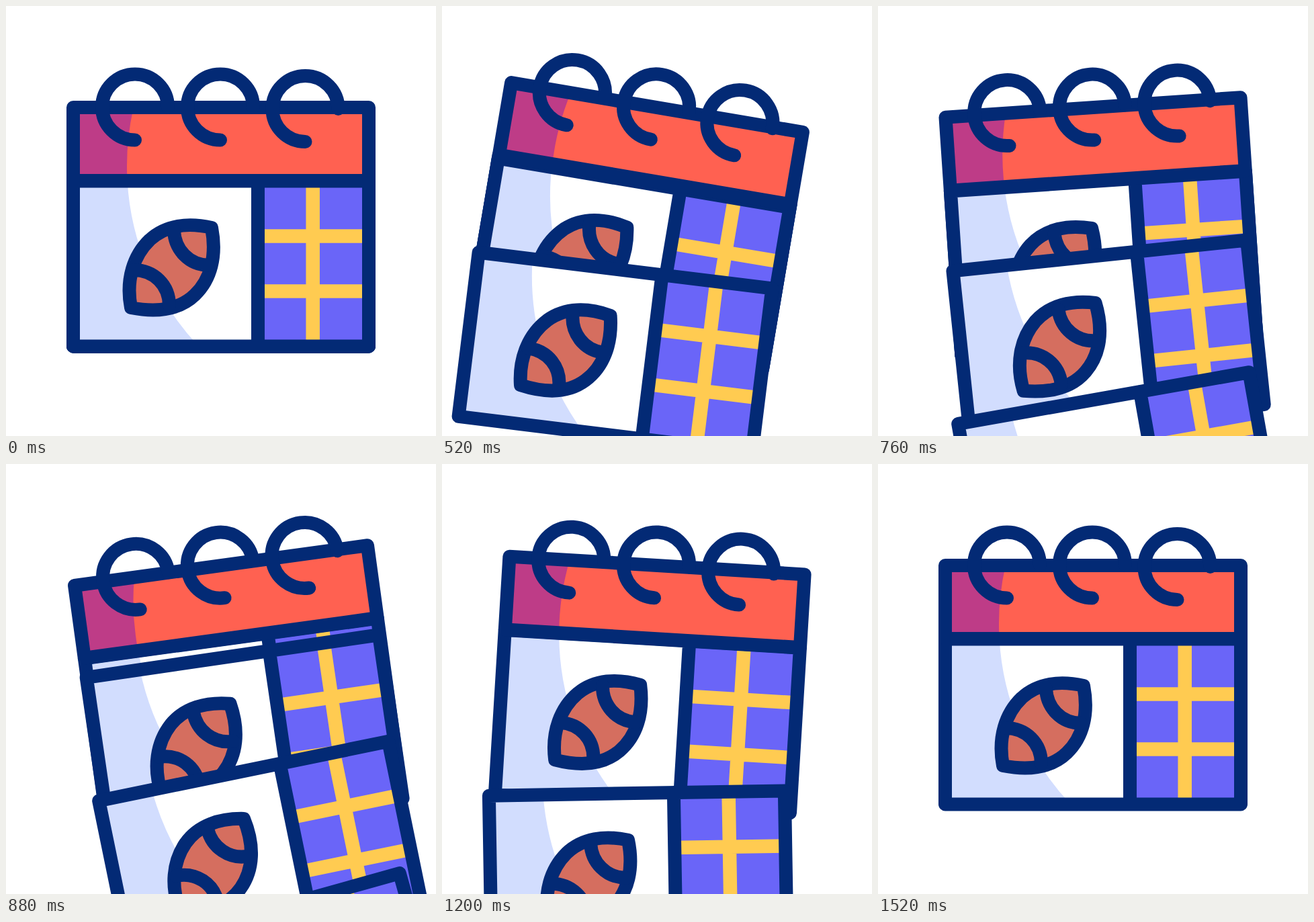
Recreate the animation shown at these times as an HTML page. Size 640 by 640 pixels, loop 1800 ms.

```html
<!DOCTYPE html>
<html lang="en">
<head>
<meta charset="utf-8">
<title>Game day calendar</title>
<style>
  html, body { margin: 0; height: 100%; overflow: hidden; background: #fff; }
  svg { display: block; width: 100vw; height: 100vh; }
  .line { fill: none; stroke: #032a75; stroke-width: 20; stroke-linecap: round; stroke-linejoin: round; }
</style>
</head>
<body>
<svg viewBox="0 0 640 640">
  <defs>
    <g id="page">
      <path fill="#fff" d="M100 260H375V506.5H100z"/>
      <path fill="#d2ddfe" d="M100 260H180.6A391 391 0 0 0 286.3 506H100z"/>
      <path fill="#6a65f8" d="M375 260H540V506.5H375z"/>
      <path fill="none" stroke="#ffcb51" stroke-width="20.5" d="M456.7 260V506M375 342.5H540M375 424.5H540"/>
      <path class="line" d="M100 260.5H540V506.5H100zM375 260.5V506.5"/>
      <path class="line" style="fill:#d56e5f" d="M306 330C314 372 305 407 281 430C257 453 222 456 186 449C178 407 190 371 214 348C238 326 271 322 306 330z"/>
      <path class="line" d="M250 334C251 362 272 386 303 386M190 393C220 393 243 415 243 446"/>
    </g>
    <path id="ring" class="line" d="M49 0A49 49 0 1 0 0 49"/>
  </defs>
  <g id="calendar">
    <use href="#page"/>
    <g id="sheets">
      <use href="#page"/>
      <use href="#page"/>
      <use href="#page"/>
    </g>
    <path fill="#ff6151" d="M100 151H540V260H100z"/>
    <path fill="#be3c87" d="M100 151H189.8A391 391 0 0 0 180.6 260H100z"/>
    <path class="line" d="M100 151H540V260H100z"/>
    <use href="#ring" x="192" y="150.5"/>
    <use href="#ring" x="319" y="150.5"/>
    <use href="#ring" x="445.5" y="153"/>
  </g>
</svg>
<script>
  const LOOP = 1800, STEP = 40;
  const SWING = [[0, 0], [167, 0], [500, 9.8], [875, -7.8], [1247, 4], [1517, 0], [LOOP, 0]]; // ms, degrees
  const FALL = { start: 188, stagger: 278.5, duration: 985, distance: 520, tilt: -10 };

  const calendar = document.getElementById('calendar');
  const sheets = [...document.getElementById('sheets').children].reverse(); // front sheet falls first

  function ease(from, to, t) {
    const u = Math.min(1, Math.max(0, (t - from) / (to - from)));
    return u * u * (3 - 2 * u);
  }

  function swingAt(t) {
    const i = SWING.findIndex(([time]) => time > t);
    const [t0, a] = SWING[i - 1], [t1, b] = SWING[i];
    return a + (b - a) * ease(t0, t1, t);
  }

  function draw(now) {
    const t = Math.floor(now % LOOP / STEP) * STEP;
    calendar.setAttribute('transform', `rotate(${swingAt(t)} 320 151)`);
    sheets.forEach((sheet, i) => {
      const start = FALL.start + i * FALL.stagger;
      const p = ease(start, start + FALL.duration, t);
      sheet.setAttribute('transform', `translate(0 ${FALL.distance * p}) rotate(${FALL.tilt * p} 320 383)`);
    });
  }

  let begin;
  function tick(now) {
    begin ??= now;
    draw(now - begin);
    requestAnimationFrame(tick);
  }
  draw(0);
  requestAnimationFrame(tick);
</script>
</body>
</html>
```
